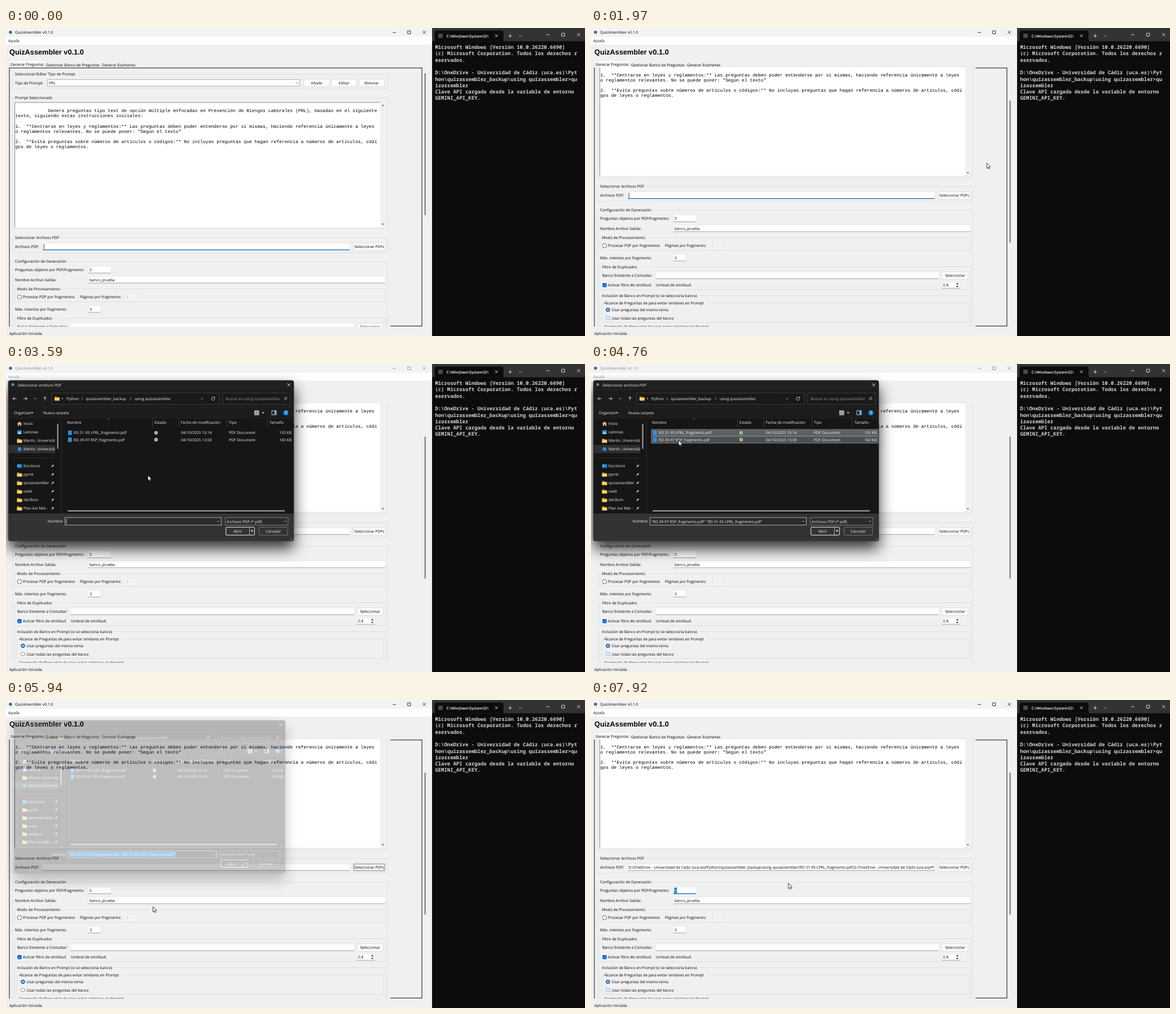
These frames come from a looping animation (1026x546 px, 8000 ms). An HTML page:

```html
<!DOCTYPE html>
<html lang="es">
<head>
<meta charset="utf-8">
<title>QuizAssembler</title>
<style>
html,body{margin:0;width:100%;height:100%;overflow:hidden;background:#f0f0f0}
svg{display:block;width:1026px;height:546px}
text{font-family:"Open Sans","Noto Sans",sans-serif;font-size:6.72px;fill:#000;white-space:pre;text-rendering:geometricPrecision}
.mono{font-family:"Liberation Mono","DejaVu Sans Mono",monospace;font-size:8.045px}
.term{font-family:"Noto Sans Mono","DejaVu Sans Mono",monospace;font-size:8.94px;font-weight:600;fill:#d2d2d2}
.head{font-family:"Liberation Sans",Arial,sans-serif;font-size:12.76px;font-weight:700}
.dlg text{fill:#f2f2f2}
.dlg .dim{fill:#999}
</style>
</head>
<body>
<svg id="stage" viewBox="0 0 1026 546" xmlns="http://www.w3.org/2000/svg"></svg>
<script>
const LOOP = 8000, STEP = 132, SCROLL = 91;

// --- drawing helpers; text is placed by its vertical middle
const attrs = o => Object.entries(o).map(([k, v]) => ` ${k}="${v}"`).join('');
const text = (x, y, s, o = {}) => `<text x="${x}" y="${y + 2.4}"${attrs(o)}>${s}</text>`;
const rect = (x, y, w, h, fill, o = {}) => `<rect x="${x}" y="${y}" width="${w}" height="${h}" fill="${fill}"${attrs(o)}/>`;
const line = (d, stroke, w = 0.8, o = {}) => `<path d="${d}" fill="none" stroke="${stroke}" stroke-width="${w}"${attrs(o)}/>`;
const dot = (x, y, r, fill, o = {}) => `<circle cx="${x}" cy="${y}" r="${r}" fill="${fill}"${attrs(o)}/>`;
const solid = (d, fill) => `<path d="${d}" fill="${fill}"/>`;
const group = (o, ...parts) => `<g${attrs(o)}>${parts.join('')}</g>`;
const down = (x, y, c, r = 2) => line(`M${x - r} ${y - r / 2}l${r} ${r}l${r} ${-r}`, c);
const mid = { 'text-anchor': 'middle' }, end = { 'text-anchor': 'end' };

// --- form widgets
const button = (x, y, w, label, id = '') =>
  rect(x, y, w, 13, '#fdfdfd', { rx: 1.5, stroke: '#d2d2d2', 'stroke-width': 0.7, id }) +
  text(x + w / 2, y + 6.5, label, mid);
const entry = (x, y, w, val = '', id = '') =>
  rect(x, y, w, 12, '#fff', { stroke: '#e4e4e4', 'stroke-width': 0.6 }) +
  line(`M${x} ${y + 11.8}h${w}`, '#8a8a8a', 0.8, { id }) + text(x + 2, y + 6.1, val);
const frame = (x, y, w, h, label, gap) =>
  line(`M${x + 2} ${y}H${x}v${h}h${w}v${-h}H${x + 4 + gap}`, '#dcdcdc', 0.8) + text(x + 4, y, label);
const check = (y, on) =>
  rect(20.7, y - 3.3, 6.6, 6.6, on ? '#0067c0' : '#fbfbfb', { rx: 1.2, stroke: on ? '#0067c0' : '#555', 'stroke-width': 0.8 }) +
  (on ? line(`M22.2 ${y}l1.3 1.4l2.4 -2.7`, '#fff', 0.8) : '');
const radio = (y, on) =>
  dot(30, y, 3.3, on ? '#0067c0' : '#fbfbfb', { stroke: on ? '#0067c0' : '#777', 'stroke-width': 0.8 }) +
  (on ? dot(30, y, 1.5, '#fff') : '');

const prompt = [
  '', '            Genera preguntas tipo test de opción múltiple enfocadas en Prevención de Riesgos Laborales (PRL), basadas en el siguiente',
  'texto, siguiendo estas instrucciones iniciales:', '',
  '1.  **Centrarse en leyes y reglamentos:** Las preguntas deben poder entenderse por sí mismas, haciendo referencia únicamente a leyes',
  'o reglamentos relevantes. No se puede poner: "Según el texto"', '',
  '2.  **Evita preguntas sobre números de artículos o códigos:** No incluyas preguntas que hagan referencia a números de artículos, códi',
  'gos de leyes o reglamentos.'
];
const pdfPath = 'D:/OneDrive - Universidad de Cádiz (uca.es)/Python/quizassembler_backup/using quizassembler/RD 31-95 LPRL_fragmento.pdf,D:/OneDrive - Universidad de Cádiz (uca.es)/Python';

const form = () => group({ id: 'form' },
  rect(7, 72, 674.5, 640, '#f0f0f0'),
  frame(12, 82, 664, 25, 'Seleccionar/Editar Tipo de Prompt', 111),
  text(16, 97.3, 'Tipo de Prompt:'),
  rect(73.5, 91.3, 447, 11.8, '#fff', { stroke: '#9a9a9a', 'stroke-width': 0.8 }),
  text(76, 97.3, 'PRL'), down(515.5, 97.3, '#555'),
  button(528, 90.8, 45, 'Añadir'), button(576.5, 90.8, 45, 'Editar'), button(625.5, 90.8, 45, 'Eliminar'),

  frame(12, 124, 664, 232, 'Prompt Seleccionado', 70),
  rect(15.5, 132, 647.5, 221, '#fff'),
  line('M15.6 353V132H663', '#777', 0.9),
  rect(663, 132, 10, 221, '#f0f0f0'),
  solid('M665.3 138.4h5l-2.5 -3.2z', '#8a8a8a'), solid('M665.3 346.6h5l-2.5 3.2z', '#8a8a8a'),
  prompt.map((s, i) => `<text class="mono" x="16.5" y="${140 + 9.13 * i}">${s}</text>`).join(''),

  frame(12, 372, 664, 26, 'Seleccionar Archivos PDF', 81),
  text(16, 387.7, 'Archivos PDF:'), entry(65, 381.5, 544, '', 'pdfLine'),
  group({ 'clip-path': 'url(#entryClip)' }, text(66.5, 387.6, pdfPath, { id: 'pdfText' })),
  line('M67.2 383v9', '#000', 0.8, { id: 'caret' }),
  button(615, 381.2, 57, 'Seleccionar PDFs', 'pick'),
  rect(616.2, 381.9, 54.8, 11.4, 'none', { stroke: '#555', 'stroke-width': 0.7, id: 'pickFocus' }),

  frame(12, 414, 664, 290, 'Configuración de Generación', 94),
  text(16, 428.7, 'Preguntas objetivo por PDF/fragmento:'), entry(146, 422.6, 40, '5', 'numLine'),
  line('M152.6 424v9', '#000', 0.7, { id: 'numCaret' }),
  group({ id: 'numSel' }, rect(147.5, 423.6, 4.7, 10, '#0078d7'), text(148, 428.7, '5', { style: 'fill:#fff' })),
  text(16, 446.7, 'Nombre Archivo Salida:'), entry(146, 440.3, 526, 'banco_prueba'),

  frame(15.5, 462.5, 657, 23, 'Modo de Procesamiento', 81),
  check(476.8, false), text(30, 477, 'Procesar PDF por fragmentos'), text(131, 477, 'Páginas por fragmento:'),
  rect(211, 471, 21, 12, '#f4f4f4', { stroke: '#e6e6e6', 'stroke-width': 0.6 }), text(213, 477, '1', { style: 'fill:#999' }),
  text(16, 498.3, 'Máx. intentos por fragmento:'), entry(146, 492.2, 21, '3'),

  frame(15.5, 514.5, 657, 40.5, 'Filtro de Duplicados', 66),
  text(20, 530, 'Banco Existente a Consultar:'), entry(114.5, 523.7, 502, ''), button(622.5, 523.2, 45.5, 'Seleccionar'),
  check(546.8, true), text(30, 547, 'Activar filtro de similitud'), text(115, 547, 'Umbral de similitud:'),
  entry(622, 540.5, 32, '0.8'), rect(645, 541, 8.5, 11, '#f7f7f7'),
  solid('M647 545.2h4.4l-2.2 -2.6z', '#333'), solid('M647 548.2h4.4l-2.2 2.6z', '#333'),

  frame(15.5, 565.5, 657, 130, 'Inclusión de Banco en Prompt (si se selecciona banco)', 172),
  frame(19.5, 578.3, 649, 34.5, 'Alcance de Preguntas de para evitar similares en Prompt', 182),
  radio(590.5, true), text(36.5, 591, 'Usar preguntas del mismo tema'),
  radio(605, false), text(36.5, 605.5, 'Usar todas las preguntas del banco'),
  frame(19.5, 621, 649, 60, 'Contenido de Preguntas de para evitar similares en Prompt', 191));

const appWindow = () =>
  rect(0, 0, 756, 546, '#f0f0f0') + rect(0, 0, 756, 16, '#f3f3f3') + rect(0, 15.5, 756, 14, '#fff') +
  dot(8, 7.5, 2.8, '#3a6ea0') +
  group({ id: 'chrome' },
    text(16, 8, 'QuizAssembler v0.1.0'), text(4, 23, 'Ayuda'),
    line('M685.3 8h5.6M711.7 5h5.2v5.2h-5.2zM738.4 5l5.4 5.4m0 -5.4l-5.4 5.4', '#000', 0.8)) +
  `<text class="head" x="6" y="47.4">QuizAssembler v0.1.0</text>` +
  rect(5.5, 57.5, 63, 13.5, '#f9f9f9') + line('M5.5 71V57.5h63V71', '#e2e2e2', 0.6) +
  text(8, 64.4, 'Generar Preguntas') + text(71, 65.4, 'Gestionar Banco de Preguntas') + text(170, 65.4, 'Generar Exámenes') +
  rect(6, 70.8, 731, 457.6, 'none', { stroke: '#333', 'stroke-width': 1.2, id: 'ring' }) +
  group({ 'clip-path': 'url(#formClip)' }, form()) +
  rect(741.5, 80, 2.4, 252, '#858585', { rx: 1.2, id: 'thumb' }) +
  text(6, 542, 'Aplicación iniciada.');

// --- terminal
const output = [
  'Microsoft Windows [Versión 10.0.26220.6690]', '(c) Microsoft Corporation. Todos los derechos r', 'eservados.', '',
  'D:\\OneDrive - Universidad de Cádiz (uca.es)\\Pyt', 'hon\\quizassembler_backup\\using quizassembler&gt;qu', 'izassembler',
  'Clave API cargada desde la variable de entorno', 'GEMINI_API_KEY.'
];
const terminal = () =>
  rect(755, 0, 271, 546, '#0c0c0c') + rect(755, 0, 271, 23.5, '#333') +
  solid('M757 23.5q2.5 0 2.5 -3V8q0 -3.5 3.5 -3.5H878q3.5 0 3.5 3.5V20.5q0 3 2.5 3z', '#0c0c0c') +
  rect(766, 10, 8, 7.5, '#4a4a4a', { rx: 0.8 }) +
  text(780.5, 14.2, 'C:\\Windows\\System32\\', { style: 'fill:#fff;font-weight:600' }) +
  line('M866.6 11.4l4.8 4.8m0 -4.8l-4.8 4.8M890.4 14h6M893.4 11v6M957.2 11.8h5.6M984.6 9.2h5.2v5.2h-5.2zM1012 9l5.4 5.4m0 -5.4l-5.4 5.4', '#fff', 0.8) +
  down(911.5, 14, '#ddd') +
  output.map((s, i) => `<text class="term" x="760.4" y="${37.2 + 11.27 * i}">${s}</text>`).join('');

// --- file dialog
const folder = (x, y) => solid(`M${x - 4.4} ${y - 3.4}h3.4l1.2 1.2h4.2v5.6h-8.8z`, '#d9a032') + rect(x - 4.4, y - 1.2, 8.8, 4.6, '#ffd267', { rx: 0.6 });
const pin = y => line(`M80 ${y + 2.4}l2 -2`, '#bbb', 0.8) + solid(`M80.6 ${y - 0.6}l3.6 -2.2l1 1l-2.2 3.6z`, '#bbb');
const picture = y => rect(20, y - 3.4, 8, 6.6, '#2f8fe0', { rx: 1 }) + solid(`M20.4 ${y + 2.8}l3 -3.2l4 3.2z`, '#d7ecff');
const home = y => solid(`M19.6 ${y}l4.4 -3.9l4.4 3.9h-1.2v3.8h-2.2v-2.4h-2v2.4h-2.2V${y}z`, '#e5b07a');
const desk = y => rect(19.8, y - 3.2, 8.6, 6.4, '#1f87d2', { rx: 0.6 }) + rect(20.8, y - 2.2, 2, 2, '#a8dcff');
const side = (y, icon, label) => icon + text(31, y, label);
const tick = (y, c, id) => group({ id }, dot(266, y, 3.1, c), line(`M264.6 ${y}l1.1 1.2l1.9 -2.2`, '#191919', 0.8));
const file = (y, name, time, size, i) =>
  rect(107, y - 6, 401.5, 12, i ? '#4b5052' : '#5c6064', { stroke: i ? '#a0a4a6' : '#82878a', 'stroke-width': 0.7, id: 'row' + i }) +
  rect(110, y - 4, 6.6, 8, '#2f8fe6', { rx: 0.8 }) + text(120, y, name) +
  tick(y, '#c9c9c9', 'off' + i) + tick(y, '#a5dc8c', 'on' + i) +
  text(310, y, '04/10/2025 ' + time) + text(395, y, 'PDF Document') + text(506, y, size, end);
const field = (x, w, c) => rect(x, 272.2, w, 13.4, '#2b2b2b', { stroke: c, 'stroke-width': 0.9 });

const dialog = () => group({ id: 'dialog', class: 'dlg' },
  rect(4, 29, 506, 285, '#191919', { rx: 4, filter: 'url(#shadow)' }),
  group({ 'clip-path': 'url(#dlgClip)' },
    rect(4, 29, 506, 17, '#202020'), rect(4, 46, 506, 31, '#1c1c1c'), rect(4, 77, 506, 19, '#1c1c1c'),
    line('M4 77h506M4 96h506', '#2a2a2a', 0.7), rect(4, 265, 506, 49, '#333')),
  rect(4, 29, 506, 285, 'none', { rx: 4, stroke: '#4a4a4a', 'stroke-width': 0.7 }),
  dot(12, 36.5, 2.5, '#4d8cc0'), text(20.5, 37.3, 'Seleccionar archivos PDF'),
  line('M498.4 34.4l5.2 5.2m0 -5.2l-5.2 5.2', '#fff', 0.8),
  line('M18.5 61.3h-6.4m2.7 -2.7l-2.7 2.7l2.7 2.7M31 61.3h6.4m-2.7 -2.7l2.7 2.7l-2.7 2.7M69 64.6v-6.6m-2.7 2.7l2.7 -2.7l2.7 2.7', '#eee', 0.9),
  down(52, 61.5, '#ddd'),
  rect(81, 51.5, 297, 20, '#191919', { stroke: '#454545', 'stroke-width': 0.8 }),
  rect(384, 51.5, 119.5, 20, '#191919', { stroke: '#454545', 'stroke-width': 0.8 }),
  folder(90.5, 61.3), text(98, 61, '«'), text(107, 61.5, 'Python'),
  text(141.5, 61.5, 'quizassembler_backup'), text(228, 61.5, 'using quizassembler'),
  line('M134 59.5l1.8 1.8l-1.8 1.8M220 59.5l1.8 1.8l-1.8 1.8', '#ddd', 0.8),
  down(347, 61.5, '#ddd'), line('M369.2 59.6a2.9 2.9 0 1 0 .6 2.2M369.8 58v2.2h-2.2', '#eee', 0.8),
  text(389, 61.5, 'Buscar en using quizassembler', { class: 'dim' }),
  dot(496, 60.6, 2, 'none', { stroke: '#ddd', 'stroke-width': 0.7 }), line('M494.5 62.2l-2 2', '#ddd', 0.8),
  text(14, 86.5, 'Organizar'), solid('M44 85.6h4.4l-2.2 2.4z', '#ddd'), text(66, 86.5, 'Nueva carpeta'),
  rect(440.5, 82.8, 7.5, 7.4, '#888', { stroke: '#eee', 'stroke-width': 0.7 }), line('M440.5 85.2h7.5M440.5 87.6h7.5', '#ddd', 0.5),
  solid('M453.4 85.6h4.4l-2.2 2.4z', '#ddd'),
  rect(471, 82.8, 8, 7.2, 'none', { stroke: '#eee', 'stroke-width': 0.8 }), rect(475.5, 82.8, 3.5, 7.2, '#4cb2f0'),
  dot(496, 86.5, 4.6, '#1289dc'), text(496, 86.5, '?', { ...mid, style: 'font-weight:700' }),

  rect(4.5, 143.5, 82.5, 14.5, '#2f2f2f'),
  group({ 'clip-path': 'url(#sideClip)' },
    side(106, home(106), 'Inicio'), side(121, picture(121), 'Láminas'),
    side(136, folder(24, 136), 'Martín, Universidad'), side(151, dot(24, 151, 3.4, '#1c8fe0'), 'Martín, Universidad')),
  rect(90.6, 106, 2.2, 44.5, '#9c9c9c', { rx: 1 }), line('M10 166.5h74', '#3a3a3a', 0.7), line('M98 97v168', '#333', 0.8),
  group({ 'clip-path': 'url(#pinClip)' }, side(181, desk(181), 'Escritorio'),
    ['pyrnk', 'quizassembler', 'ovelt', 'dat3lum', 'Plan Aul Mat -'].map((s, i) => side(196 + 15 * i, folder(24, 196 + 15 * i), s)).join('')),
  [0, 1, 2, 3, 4, 5].map(i => pin(181 + 15 * i)).join(''),

  text(108, 104, 'Nombre'), text(263, 104, 'Estado'), text(310, 104, 'Fecha de modificación'), text(395, 104, 'Tipo'), text(467, 104, 'Tamaño'),
  line('M180.2 98.3l1.8 -1.6l1.8 1.6', '#bbb', 0.6), line('M259.5 97v15M306.5 97v15M391.5 97v15M462.5 97v15', '#505050', 0.7),
  file(122, 'RD 31-95 LPRL_fragmento.pdf', '10:14', '135 KB', 0),
  file(134.2, 'RD 39-97 RSP_fragmento.pdf', '13:00', '160 KB', 1),
  rect(109, 259.3, 385, 2.1, '#9c9c9c', { rx: 1 }),

  text(101.5, 279, 'Nombre:', end), field(104.6, 277, '#bbb'), field(388.8, 111, '#8a8a8a'),
  rect(106.2, 274, 200, 9.8, '#0078d7', { id: 'nameSel' }),
  text(106.8, 279.2, '', { id: 'name' }), line('M107 274.5v9', '#fff', 0.7, { id: 'nameCaret' }),
  down(376.5, 279, '#ddd'), text(391, 279.2, 'Archivos PDF (*.pdf)'), down(494.5, 279, '#ddd'),
  rect(389.8, 289.3, 50.5, 14, '#333', { rx: 1, stroke: '#eee', 'stroke-width': 1, id: 'open' }),
  line('M431.5 290v13', '#ddd', 0.7), text(410.5, 296.5, 'Abrir', mid), solid('M433.4 294.8h5l-2.5 2.8z', '#eee'),
  rect(448.5, 289.3, 50.5, 14, '#333', { rx: 1, stroke: '#8a8a8a', 'stroke-width': 0.8 }), text(473.7, 296.5, 'Cancelar', mid),
  line('M503.4 312.4l4 -4M505.4 312.4l2 -2', '#aaa', 0.7));

const clip = (id, x, y, w, h, rx = 0) => `<clipPath id="${id}">${rect(x, y, w, h, '#000', { rx })}</clipPath>`;
const defs = `<defs>
  <filter id="shadow" x="-20%" y="-20%" width="140%" height="150%"><feDropShadow dx="0" dy="13" stdDeviation="13" flood-color="#000" flood-opacity=".8"/></filter>
  ${clip('formClip', 6.7, 70, 675, 459.5)}${clip('entryClip', 65.5, 381, 542.5, 13)}
  ${clip('dlgClip', 4, 29, 506, 285, 4)}${clip('sideClip', 4, 97, 83, 69)}${clip('pinClip', 4, 170, 75, 95)}</defs>`;
const pointer = group({ id: 'cursor' },
  `<path id="arrow" d="M.4 .4v9.4l2.1 -2l1.4 3.1l1.6 -.7l-1.4 -3h3z" fill="#fff" stroke="#111" stroke-width=".8" stroke-linejoin="round"/>`,
  line('M-1.8 -4.6q1.8 0 1.8 1.2q0 -1.2 1.8 -1.2M0 -3.4v7M-1.8 4.8q1.8 0 1.8 -1.2q0 1.2 1.8 1.2', '#222', 0.8, { id: 'beam' }));

document.getElementById('stage').innerHTML = defs + appWindow() + terminal() + dialog() + pointer;
const el = Object.fromEntries([...document.querySelectorAll('[id]')].map(e => [e.id, e]));

// --- motion: keys are [step, x, y]
const path = [
  [5, 799, 140], [6, 769, 182], [7, 757, 200], [9, 722, 225], [11, 706, 237], [12, 701, 239], [15, 701, 239], [16, 735, 276],
  [17, 788, 300], [18, 740, 304], [19, 680, 302], [20, 644, 297], [22, 644, 297], [24, 455, 233], [27, 251, 197],
  [33, 150, 121], [34, 150, 124], [36, 155, 135], [38, 160, 140], [42, 409, 292], [43, 409, 292], [45, 260, 366], [50, 164, 336],
  [51, 165, 336], [53, 161, 336], [55, 121, 338], [57, 190, 340], [60, 349.5, 324.5]
];
function pointAt(n) {
  const i = path.findIndex(k => k[0] >= n);
  if (i < 0) return path[path.length - 1].slice(1);
  const b = path[i], a = path[Math.max(0, i - 1)];
  const p = b[0] === a[0] ? 1 : (n - a[0]) / (b[0] - a[0]);
  return [a[1] + (b[1] - a[1]) * p, a[2] + (b[2] - a[2]) * p];
}
const fade = { 25: [0.4, 0.95], 26: [0.88, 0.99], 44: [0.75, 0.985], 45: [0.28, 0.95] };

const show = (id, on) => el[id].setAttribute('visibility', on ? 'inherit' : 'hidden');
const set = (id, o) => Object.entries(o).forEach(([k, v]) => el[id].setAttribute(k, v));
const within = (n, a, b) => n >= a && n <= b;

function draw(t) {
  const n = Math.floor((t + 14) / STEP);
  const active = !within(n, 2, 8) && !within(n, 24, 43);
  const scroll = SCROLL * Math.min(1, Math.max(0, (n - 11) / 3));
  set('form', { transform: `translate(0 ${-scroll})` });
  set('thumb', { y: 80 + 48.5 * scroll / SCROLL });
  set('chrome', { opacity: active ? 1 : 0.45 });
  show('ring', active);

  const typing = active && n < 21, inNumber = n >= 51;
  set('pdfLine', { stroke: typing ? '#0067c0' : '#8a8a8a', 'stroke-width': typing ? 1.3 : 0.8 });
  show('caret', typing && (n < 2 || (n - 8) % 7 < 5));
  show('pdfText', n >= 47);
  const pressed = within(n, 21, 22);
  set('pick', { fill: pressed ? '#e5f1fb' : '#fdfdfd', stroke: pressed ? '#0078d4' : '#d2d2d2' });
  show('pickFocus', active && within(n, 21, 50));
  set('numLine', { stroke: inNumber ? '#0067c0' : '#8a8a8a', 'stroke-width': inNumber ? 1.3 : 0.8 });
  show('numCaret', within(n, 51, 53));
  show('numSel', n >= 54);

  show('dialog', within(n, 25, 45));
  const [alpha, k] = fade[n] || [1, 1];
  set('dialog', { opacity: alpha, transform: `translate(${257 - (1 - k) * 50} 171.5) scale(${k}) translate(-257 -171.5)` });
  const opened = n >= 43;
  [33, 35].forEach((from, i) => {
    const on = n >= from && !opened;
    show('row' + i, on); show('on' + i, on); show('off' + i, !on);
  });
  el.name.textContent = n < 33 ? '' : n < 35 ? 'RD 31-95 LPRL_fragmento.pdf'
    : '"RD 39-97 RSP_fragmento.pdf" "RD 31-95 LPRL_fragmento.pdf"';
  show('nameSel', opened);
  show('nameCaret', n < 33);
  set('open', { fill: within(n, 42, 43) ? '#454545' : '#333' });

  const [x, y] = pointAt(n), beam = within(n, 51, 55);
  show('cursor', n >= 5);
  show('arrow', !beam); show('beam', beam);
  set('cursor', { transform: `translate(${x} ${y})` });
}

const start = performance.now();
function run(now) {
  draw(Math.max(0, now - start) % LOOP);
  requestAnimationFrame(run);
}
draw(0);
requestAnimationFrame(run);
</script>
</body>
</html>
```
